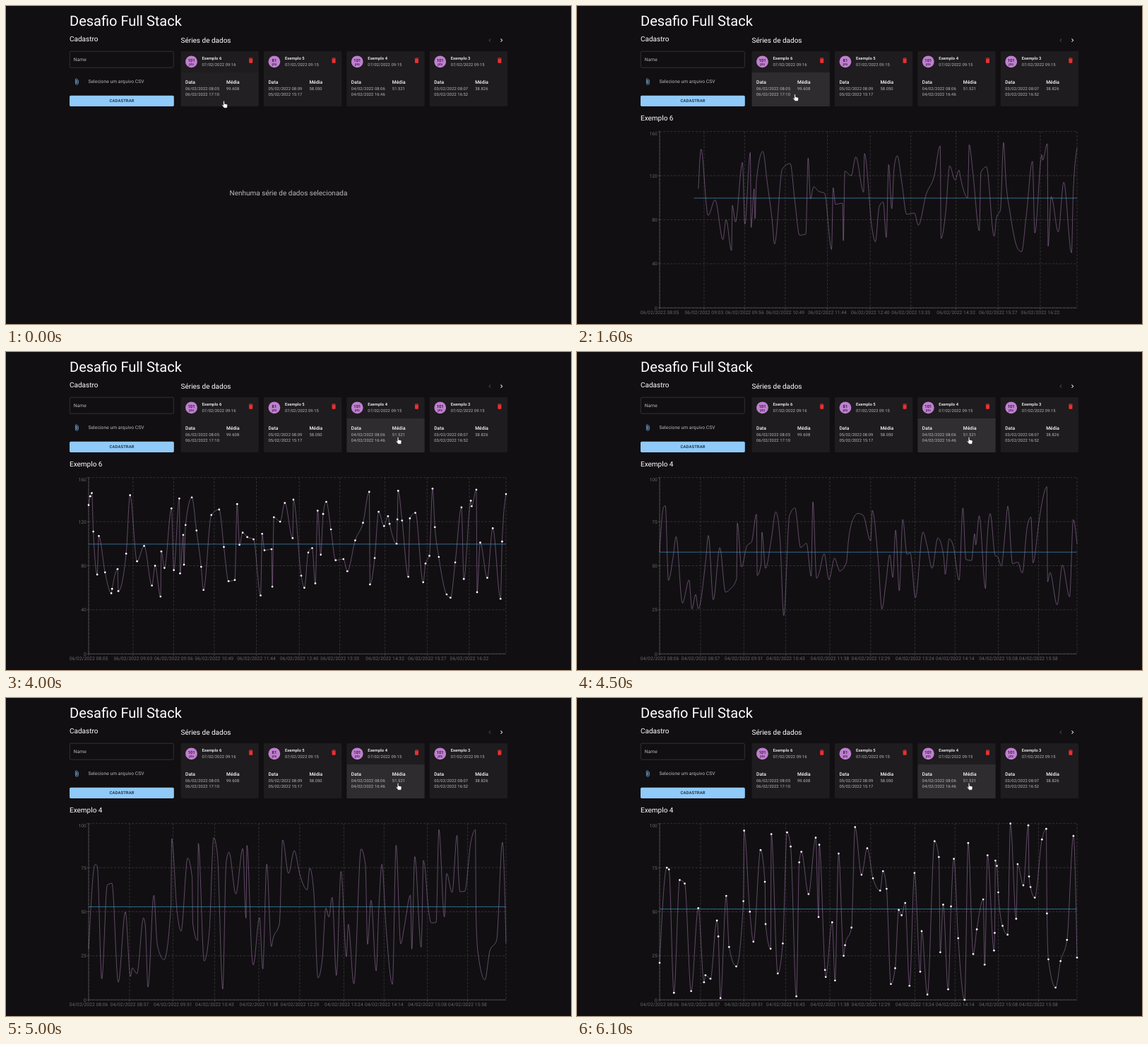
An HTML page for the animation above (6.3 s loop, 800 by 450 pixels).

```html
<!DOCTYPE html>
<html lang="pt-BR">
<head>
<meta charset="utf-8">
<title>Desafio Full Stack</title>
<style>
  html, body { margin: 0; width: 100%; height: 100%; overflow: hidden; background: #110f12; }
  svg { display: block; width: 100vw; height: 100vh; }
  text { font-family: Roboto, sans-serif; fill: #fff; text-rendering: geometricPrecision; white-space: pre; }
  .h3 { font-size: 20px; }
  .h5 { font-size: 10px; }
  .body { font-size: 6.67px; letter-spacing: .0094em; }
  .small { font-size: 5.83px; letter-spacing: .0107em; }
  .strong { font-weight: 500; }
  .dim { fill: #b9b8ba; }
  .tick { font-size: 6.67px; letter-spacing: .0094em; fill: #666; }
  .button { font-size: 5.83px; font-weight: 500; letter-spacing: .0286em; fill: #17212a; }
  .points { font-size: 5.83px; font-weight: 500; fill: #1b121d; }
  .unit { font-size: 5px; fill: #1b121d; }
  .mid { text-anchor: middle; }
  .end { text-anchor: end; }
  .grid { stroke: #4a494b; stroke-width: .6; stroke-dasharray: 3 2.1; }
  .axis { stroke: #666; stroke-width: .6; }
  .curve { fill: none; stroke: #c592cf; stroke-width: .45; }
  .mean { fill: none; stroke: #429fd2; stroke-width: .65; }
</style>
</head>
<body>
<svg id="stage" viewBox="0 0 800 450"></svg>
<script>
const LOOP = 6300, STEP = 100, DRAW = 1500;
const SHOW_CHART = 600, DRAW_START = 620, SWITCH = 4100, MORPH_START = 4115;
const LEFT = 117, RIGHT = 708, TOP = 177.7, BOTTOM = 427.2;

const ICONS = {
  clip: 'M16.5 6v11.5c0 2.21-1.79 4-4 4s-4-1.79-4-4V5c0-1.38 1.12-2.5 2.5-2.5s2.5 1.12 2.5 2.5v10.5c0 .55-.45 1-1 1s-1-.45-1-1V6H10v9.5c0 1.38 1.12 2.5 2.5 2.5s2.5-1.12 2.5-2.5V5c0-2.21-1.79-4-4-4S7 2.79 7 5v12.5c0 3.04 2.46 5.5 5.5 5.5s5.5-2.46 5.5-5.5V6z',
  bin: 'M6 19c0 1.1.9 2 2 2h8c1.1 0 2-.9 2-2V7H6zM19 4h-3.5l-1-1h-5l-1 1H5v2h14z',
  prev: 'M15.41 7.41 14 6l-6 6 6 6 1.41-1.41L10.83 12z',
  next: 'M10 6 8.59 7.41 13.17 12l-4.58 4.59L10 18l6-6z'
};

const cards = [
  { name: 'Exemplo 6', points: 101, saved: '07/02/2022 09:16', day: '06/02/2022', from: '08:05', to: '17:10', mean: '99.608' },
  { name: 'Exemplo 5', points: 81, saved: '07/02/2022 09:15', day: '05/02/2022', from: '08:09', to: '15:17', mean: '58.050' },
  { name: 'Exemplo 4', points: 101, saved: '07/02/2022 09:15', day: '04/02/2022', from: '08:06', to: '16:46', mean: '51.521' },
  { name: 'Exemplo 3', points: 101, saved: '07/02/2022 09:15', day: '03/02/2022', from: '08:07', to: '16:52', mean: '38.826' }
];

const sixth = {
  card: cards[0], max: 160, lowest: 50, first: 135, last: 145, seed: 6,
  times: '08:05 09:03 09:56 10:49 11:44 12:40 13:33 14:32 15:27 16:22'
};
const fourth = {
  card: cards[2], max: 100, lowest: 0, first: 21, last: 24, seed: 4,
  times: '08:06 08:57 09:51 10:43 11:38 12:29 13:24 14:14 15:08 15:58'
};

const clamp = v => Math.min(1, Math.max(0, v));
const mix = (a, b, p) => a + (b - a) * p;
const smooth = u => u * u * (3 - 2 * u);
const range = (t, from, length) => clamp((t - from) / length);

// CSS "ease": cubic-bezier(.25, .1, .25, 1)
function ease(x) {
  const bezier = (a, b, s) => 3 * a * s * (1 - s) ** 2 + 3 * b * s * s * (1 - s) + s ** 3;
  let low = 0, high = 1;
  for (let i = 0; i < 24; i++) {
    const s = (low + high) / 2;
    if (bezier(.25, .25, s) < x) low = s; else high = s;
  }
  return bezier(.1, 1, high);
}

function seededRandom(seed) {
  return () => {
    seed = (seed + 0x6d2b79f5) | 0;
    let n = Math.imul(seed ^ (seed >>> 15), seed | 1);
    n ^= n + Math.imul(n ^ (n >>> 7), n | 61);
    return ((n ^ (n >>> 14)) >>> 0) / 2 ** 32;
  };
}

const yOf = (series, value) => mix(BOTTOM, TOP, value / series.max);

// Each value of the range occurs once, 1 to 10 minutes after the one before
function makePoints(series) {
  const random = seededRandom(series.seed);
  const { first, last, lowest } = series;
  const values = Array.from({ length: series.card.points }, (_, i) => lowest + i)
    .filter(v => v !== first && v !== last);
  for (let i = values.length - 1; i > 0; i--) {
    const j = Math.floor(random() * (i + 1));
    [values[i], values[j]] = [values[j], values[i]];
  }
  let minute = 0;
  const minutes = [0, ...values.map(() => minute += 1 + Math.floor(random() * 10)), minute + 5];
  return [first, ...values, last].map((value, i) =>
    [mix(LEFT, RIGHT, minutes[i] / (minute + 5)), yOf(series, value)]);
}

const stage = document.getElementById('stage');
function add(parent, tag, attrs = {}) {
  const node = document.createElementNS('http://www.w3.org/2000/svg', tag);
  set(node, attrs);
  return parent.appendChild(node);
}
function set(node, attrs) {
  for (const key in attrs) node.setAttribute(key, attrs[key]);
}
function text(parent, x, y, content, style) {
  add(parent, 'text', { x, y, class: style }).textContent = content;
}
function icon(x, y, name, fill) {
  add(stage, 'path', { d: ICONS[name], fill, transform: `translate(${x} ${y}) scale(.4167)` });
}
function show(node, visible) {
  node.setAttribute('visibility', visible ? 'visible' : 'hidden');
}

function buildForm() {
  text(stage, 90, 28.3, 'Desafio Full Stack', 'h3');
  text(stage, 90, 50.1, 'Cadastro', 'h5');
  add(stage, 'rect', { x: 90.3, y: 64.2, width: 147, height: 23, rx: 1.7, fill: 'none', stroke: '#4a494b', 'stroke-width': .6 });
  text(stage, 95.8, 77.9, 'Name', 'body dim');
  icon(95, 102, 'clip', '#90caf9');
  text(stage, 116.5, 109.2, 'Selecione um arquivo CSV', 'body dim');
  add(stage, 'rect', { x: 90, y: 126.8, width: 147.8, height: 15.2, rx: 1.7, fill: '#90caf9' });
  text(stage, 164, 136.4, 'CADASTRAR', 'button mid');
}

function buildCard(card, index) {
  const x = 247.5 + index * 117.4;
  const clip = add(stage, 'clipPath', { id: 'clip' + index });
  add(clip, 'rect', { x, y: 94, width: 110.4, height: 48 });
  add(stage, 'rect', { x, y: 64, width: 110.4, height: 78, rx: 1.7, fill: '#1e1c1e' });
  card.hover = add(stage, 'rect', { x, y: 94, width: 110.4, height: 48, fill: '#fff', 'fill-opacity': 0 });
  card.ripple = add(stage, 'circle', { fill: '#fff', 'fill-opacity': 0, 'clip-path': `url(#clip${index})` });
  add(stage, 'circle', { cx: x + 15, cy: 78.8, r: 8.4, fill: '#c17fd1' });
  text(stage, x + 15, 78.7, card.points, 'points mid');
  text(stage, x + 15, 83.5, 'pts', 'unit mid');
  text(stage, x + 30, 76.4, card.name, 'small strong');
  text(stage, x + 30, 84.6, card.saved, 'small dim');
  icon(x + 94.2, 72, 'bin', '#ee2f31');
  text(stage, x + 6.5, 109.8, 'Data', 'body strong');
  text(stage, x + 64.5, 109.8, 'Média', 'body strong');
  text(stage, x + 6.5, 118.8, `${card.day} ${card.from}`, 'small dim');
  text(stage, x + 6.5, 127.1, `${card.day} ${card.to}`, 'small dim');
  text(stage, x + 64.5, 118.8, card.mean, 'small dim');
}

function minuteOf(time) {
  const [hours, minutes] = time.split(':').map(Number);
  return hours * 60 + minutes;
}

function buildFrame(series) {
  const group = add(stage, 'g');
  const line = (x1, y1, x2, y2, style) => add(group, 'line', { x1, y1, x2, y2, class: style });
  const { name, day, from, to } = series.card;
  const start = minuteOf(from), length = minuteOf(to) - start;
  text(group, 90, 162, name, 'h5');
  for (const time of series.times.split(' ')) {
    const x = mix(LEFT, RIGHT, (minuteOf(time) - start) / length);
    line(x, TOP, x, BOTTOM, 'grid');
    line(x, BOTTOM, x, BOTTOM + 2.5, 'axis');
    text(group, x, 435.6, `${day} ${time}`, 'tick mid');
  }
  line(RIGHT, TOP, RIGHT, BOTTOM, 'grid');
  for (let i = 0; i <= 4; i++) {
    const y = mix(BOTTOM, TOP, i / 4);
    line(LEFT, y, RIGHT, y, 'grid');
    line(LEFT - 2.5, y, LEFT, y, 'axis');
    text(group, 113.8, Math.max(183, y + 2.5), series.max * i / 4, 'tick end');
  }
  line(LEFT, TOP, LEFT, BOTTOM, 'axis');
  line(LEFT, BOTTOM, RIGHT, BOTTOM, 'axis');
  return group;
}

function buildDots(series) {
  const group = add(stage, 'g', { fill: '#fff' });
  for (const [cx, cy] of series.points) add(group, 'circle', { cx, cy, r: 1.35 });
  return group;
}

// Monotone cubic through the points
function monotonePath(points) {
  const last = points.length - 1;
  const slope = i => (points[i + 1][1] - points[i][1]) / (points[i + 1][0] - points[i][0]);
  const tangents = points.map((p, i) => {
    if (i === 0 || i === last) return null;
    const h0 = p[0] - points[i - 1][0], h1 = points[i + 1][0] - p[0];
    const s0 = slope(i - 1), s1 = slope(i);
    const mean = (s0 * h1 + s1 * h0) / (h0 + h1);
    return (Math.sign(s0) + Math.sign(s1)) * Math.min(Math.abs(s0), Math.abs(s1), Math.abs(mean) / 2);
  });
  tangents[0] = (3 * slope(0) - tangents[1]) / 2;
  tangents[last] = (3 * slope(last - 1) - tangents[last - 1]) / 2;
  let d = 'M' + points[0];
  for (let i = 0; i < last; i++) {
    const [x0, y0] = points[i], [x1, y1] = points[i + 1], dx = (x1 - x0) / 3;
    d += `C${[x0 + dx, y0 + dx * tangents[i], x1 - dx, y1 - dx * tangents[i + 1], x1, y1].map(v => v.toFixed(2))}`;
  }
  return d;
}

buildForm();
text(stage, 247.5, 52, 'Séries de dados', 'h5');
icon(680, 43.6, 'prev', '#4d4c4e');
icon(696.6, 43.6, 'next', '#fff');
cards.forEach(buildCard);

const empty = add(stage, 'g');
text(empty, 400, 268, 'Nenhuma série de dados selecionada', 'h5 dim mid');

for (const series of [sixth, fourth]) {
  series.frame = buildFrame(series);
  series.points = makePoints(series);
  series.meanY = yOf(series, +series.card.mean);
}
const curve = add(stage, 'path', { class: 'curve', pathLength: 1 });
const meanLine = add(stage, 'path', { class: 'mean', pathLength: 1 });
const sixthDots = buildDots(sixth), fourthDots = buildDots(fourth);

const cursor = add(stage, 'path', {
  d: 'M-1.6.8c0-1 1.6-1 1.6 0v3.2l3.4.8q1 .3.9 1.3l-.5 3q-.1.5-.4.9h-3.8q-.8-.6-1.2-1.5l-1.9-2.2q-.3-.9.7-.7l1.2.7z',
  fill: '#fff', stroke: '#161616', 'stroke-width': .5
});

const hovers = [
  { card: cards[0], enter: -60, leave: 3070 },
  { card: cards[1], enter: 3085, leave: 3270 },
  { card: cards[2], enter: 3285, leave: LOOP }
];
const clicks = [
  { card: cards[0], start: 490, cx: 309, cy: 126 },
  { card: cards[2], start: 4010, cx: 555.5, cy: 121 }
];

function drawPointer(t) {
  const rise = smooth(range(t, 0, 300)), travel = smooth(range(t, 2900, 600));
  const x = mix(309.3, 555.8, travel);
  const y = mix(mix(134.3, 124.6, rise), 120.2, travel);
  set(cursor, { transform: `translate(${x} ${y})` });
  for (const { card, enter, leave } of hovers) {
    const level = range(t, enter, 250) - range(t, leave, 250);
    set(card.hover, { 'fill-opacity': .07 * level });
  }
  for (const { card, start, cx, cy } of clicks) {
    const age = t - start;
    const opacity = age > 0 ? .3 * (1 - range(age, 90, 410)) : 0;
    set(card.ripple, { cx, cy, r: 115 * ease(range(age, 0, 550)), 'fill-opacity': opacity });
  }
}

function drawChart(t) {
  const reveal = ease(range(t, DRAW_START, DRAW));
  const morph = ease(range(t, MORPH_START, DRAW));
  const points = sixth.points.map(([x, y], i) => {
    const [endX, endY] = fourth.points[i];
    return [mix(x, endX, morph), mix(y, endY, morph)];
  });
  // Both lines are uncovered from right to left
  const dash = reveal < 1
    ? { 'stroke-dasharray': `${reveal} 2`, 'stroke-dashoffset': reveal - 1 }
    : { 'stroke-dasharray': 'none', 'stroke-dashoffset': 0 };
  set(curve, { d: monotonePath(points), ...dash });
  set(meanLine, { d: `M${LEFT} ${mix(sixth.meanY, fourth.meanY, morph)}H${RIGHT}`, ...dash });

  show(empty, t < SHOW_CHART);
  show(sixth.frame, t >= SHOW_CHART && t < SWITCH);
  show(fourth.frame, t >= SWITCH);
  show(curve, t > DRAW_START);
  show(meanLine, t > DRAW_START);
  show(sixthDots, t >= DRAW_START + DRAW && t < SWITCH);
  show(fourthDots, t >= MORPH_START + DRAW);
}

const begin = performance.now();
function tick() {
  const elapsed = (performance.now() - begin) % LOOP;
  const t = Math.floor(elapsed / STEP) * STEP;
  drawPointer(t);
  drawChart(t);
  requestAnimationFrame(tick);
}
tick();
</script>
</body>
</html>
```
